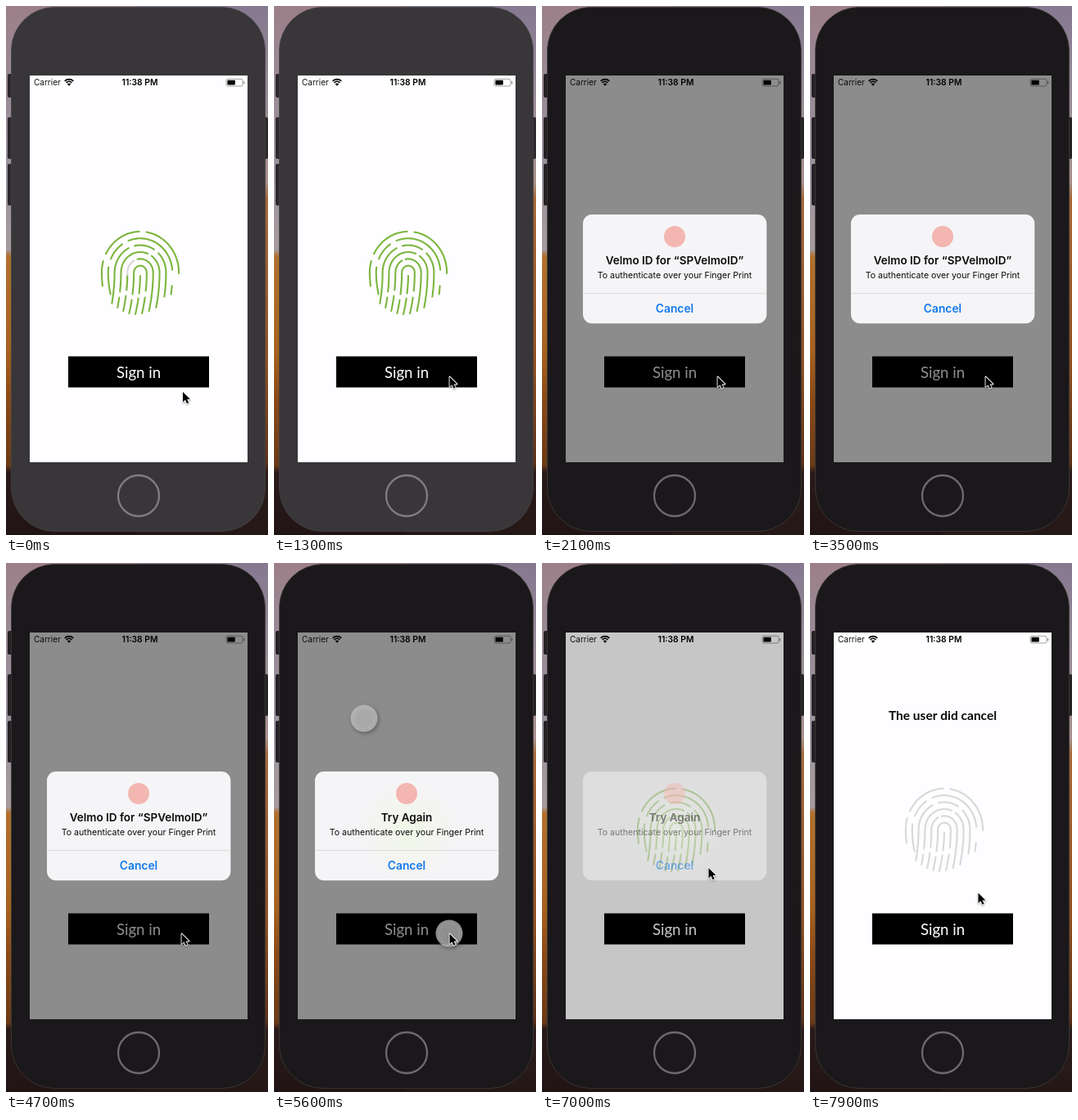
An HTML page with a canvas that plays this animation: 320x647 px, repeating every 8 s.

```html
<!DOCTYPE html>
<html lang="en">
<head>
<meta charset="utf-8">
<title>Fingerprint sign in</title>
<style>
html, body { margin: 0; width: 100%; height: 100%; overflow: hidden; background: #231419; }
canvas { display: block; width: 320px; height: 647px; }
</style>
</head>
<body>
<canvas id="stage"></canvas>
<script>
const W = 320, H = 647, LOOP = 8000;
const canvas = document.getElementById('stage');
const ctx = canvas.getContext('2d');
const dpr = window.devicePixelRatio || 1;
canvas.width = W * dpr;
canvas.height = H * dpr;

const UI = 'Inter, Roboto, sans-serif';
const GEO = 'Lato, "Open Sans", sans-serif';

const clamp = v => Math.max(0, Math.min(1, v));
const span = (t, a, b) => clamp((t - a) / (b - a));
const easeOut = u => 1 - (1 - u) * (1 - u);
const easeInOut = u => u * u * (3 - 2 * u);

function text(str, x, y, font, color, align = 'center') {
  ctx.font = font;
  ctx.fillStyle = color;
  ctx.textAlign = align;
  ctx.fillText(str, x, y);
}

function box(x, y, w, h, r, fill) {
  ctx.beginPath();
  ctx.roundRect(x, y, w, h, r);
  ctx.fillStyle = fill;
  ctx.fill();
}

function disc(x, y, r, fill) {
  ctx.beginPath();
  ctx.arc(x, y, r, 0, Math.PI * 2);
  ctx.fillStyle = fill;
  ctx.fill();
}

function fade(stops) {
  const g = ctx.createLinearGradient(0, 0, 0, H);
  stops.forEach(([y, c]) => g.addColorStop(y / H, c));
  return g;
}

const skyLeft = fade([[0, '#9c7f88'], [60, '#9a8792'], [200, '#9a939f'], [298, '#a59a9d'],
  [306, '#b0702f'], [420, '#a8621f'], [480, '#8a4a18'], [562, '#6a3a17'], [570, '#2a1a1a'], [647, '#211414']]);
const skyRight = fade([[0, '#857890'], [100, '#978a98'], [215, '#a8908c'], [235, '#a8683a'],
  [440, '#8f4f20'], [560, '#5c3018'], [570, '#2c1c1a'], [647, '#241816']]);

function drawPhone(active) {
  ctx.fillStyle = skyLeft;
  ctx.fillRect(0, 0, W / 2, H);
  ctx.fillStyle = skyRight;
  ctx.fillRect(W / 2, 0, W / 2, H);

  const key = active ? '#232124' : '#2b292c';
  [[83, 29], [136, 51], [193, 51]].forEach(([y, h]) => box(2, y, 8, h, 2, key));
  box(313, 136, 7, 51, 2, key);

  box(6.5, 1.5, 310, 641, 53, active ? '#1a181a' : '#383639');
  ctx.lineWidth = 0.8;
  ctx.strokeStyle = active ? '#3f3c38' : '#454346';
  ctx.stroke();

  ctx.beginPath();
  ctx.arc(162, 599, 25, 0, Math.PI * 2);
  ctx.lineWidth = 2.3;
  ctx.strokeStyle = active ? '#6c6a6c' : '#7f7d80';
  ctx.stroke();

  ctx.fillStyle = '#fefdff';
  ctx.fillRect(29, 85, 266, 473);
}

function drawStatus() {
  text('Carrier', 34, 97.3, '10px ' + UI, '#111', 'left');
  text('11:38 PM', 163.5, 97.3, '600 10.3px ' + UI, '#000');

  ctx.strokeStyle = '#000';
  ctx.lineWidth = 1.7;
  [7.5, 4.8].forEach(r => {
    ctx.beginPath();
    ctx.arc(77, 97.2, r, -Math.PI * 0.75, -Math.PI * 0.25);
    ctx.stroke();
  });
  ctx.beginPath();
  ctx.moveTo(77, 97.8);
  ctx.arc(77, 97.8, 3.2, -Math.PI * 0.75, -Math.PI * 0.25);
  ctx.fillStyle = '#000';
  ctx.fill();

  ctx.beginPath();
  ctx.roundRect(269, 89.3, 20, 8.7, 2);
  ctx.lineWidth = 0.8;
  ctx.strokeStyle = '#8a898b';
  ctx.stroke();
  box(270.4, 90.7, 9.4, 5.9, 0.8, '#000');
  box(290, 92, 1.2, 3.4, 0.6, '#8a898b');
}

// Ridges: ring, start, end. |s| <= 1 is the arch, beyond that a leg running down.
const ridges = [
  [6, -0.7, -0.02], [6, 0.1, 1.02], [6, -0.82, -1.32],
  [5, -0.74, -0.38], [5, -0.24, 0.95], [5, -0.9, -1.52], [5, 1.32, 1.52],
  [4, -1.74, -0.3], [4, -0.14, 0.36], [4, 0.5, 1.58],
  [3, -1.84, -1.6], [3, -1.46, 0.25], [3, 0.4, 1.84],
  [2, -1.92, -1.56], [2, -1.42, -0.32], [2, -0.14, 1.92],
  [1, -1.98, -1.66], [1, -1.52, 1.44], [1, 1.6, 1.98],
  [0, 1.08, 1.5], [0, 1.62, 2]
];
const LATE = 14;

function ridgePoint(ring, s) {
  const side = Math.sign(s), a = Math.min(1, Math.abs(s)) * Math.PI / 2;
  const leg = Math.max(0, Math.abs(s) - 1);
  const r = ring * 7.85;
  const drift = side < 0 && ring > 4 ? 11 : -6;
  return [164 + side * r * Math.sin(a) + drift * Math.pow(leg, 2),
    326 - r * 1.065 * Math.cos(a) + leg * 51];
}

function drawRidge([ring, s0, s1], part, color) {
  if (part <= 0) return;
  ctx.beginPath();
  for (let i = 0; i <= 24; i++) {
    ctx.lineTo(...ridgePoint(ring, s0 + (s1 - s0) * part * i / 24));
  }
  ctx.strokeStyle = color;
  ctx.stroke();
}

function drawPrint(t) {
  const left = 1 - span(t, 7200, 7850);
  ctx.lineWidth = 2.1;
  ctx.lineCap = 'round';
  ridges.forEach((ridge, i) => {
    const drawn = i === LATE ? 0.3 + 0.7 * span(t, 0, 400) : 1;
    const part = drawn * left;
    if (part < 1) drawRidge(ridge, 1, '#d9d7d9');
    drawRidge(ridge, part, '#7cb63f');
  });
  ctx.lineCap = 'butt';
}

function drawScreen(t) {
  drawStatus();
  drawPrint(t);
  ctx.globalAlpha = span(t, 7200, 7300);
  text('The user did cancel', 162, 192, 'bold 15.5px ' + GEO, '#0a0a0a');
  ctx.globalAlpha = 1;
  ctx.fillStyle = '#000';
  ctx.fillRect(76, 428.5, 172, 38);
  text('Sign in', 162, 455, '18.6px ' + GEO, '#fff');
}

function drawAlert(t) {
  const shown = easeOut(span(t, 1500, 1940));
  const kept = 1 - easeInOut(span(t, 6850, 7150));
  if (!shown || !kept) return;
  const retry = t >= 5400;

  ctx.fillStyle = `rgba(0,0,0,${0.447 * shown * kept})`;
  ctx.fillRect(29, 85, 266, 473);

  ctx.save();
  ctx.globalAlpha = Math.min(1, shown * 1.25) * kept;
  const k = 1.2 - 0.2 * shown;
  ctx.translate(162, 321.5);
  ctx.scale(k, k);
  ctx.translate(-162, -321.5);

  box(50, 255, 224.3, 133.3, 11, '#f5f4f6');
  if (retry) {
    const glow = ctx.createRadialGradient(164, 326, 5, 164, 326, 58);
    glow.addColorStop(0, 'rgba(240,247,228,.8)');
    glow.addColorStop(1, 'rgba(240,247,228,0)');
    ctx.fillStyle = glow;
    ctx.fill();
  }
  disc(162, 282, 13, '#f3b6b0');
  text(retry ? 'Try Again' : 'Velmo ID for “SPVelmoID”', 162, 316, '600 13.5px ' + UI, '#0b0b0c');
  text('To authenticate over your Finger Print', 162, 333.4, '10.6px ' + UI, '#0b0b0c');
  ctx.fillStyle = '#d8d7da';
  ctx.fillRect(50, 351, 224.3, 0.8);
  text('Cancel', 162, 375, '600 13.8px ' + UI, '#1279ee');
  ctx.restore();
}

function drawTouches(t) {
  if (t < 5000 || t >= 5900) return;
  [[110, 190], [214, 453]].forEach(([x, y]) => {
    ctx.save();
    ctx.shadowColor = 'rgba(0,0,0,.45)';
    ctx.shadowBlur = 5 * dpr;
    ctx.shadowOffsetX = 1.5 * dpr;
    ctx.shadowOffsetY = 2 * dpr;
    disc(x, y, 16.5, 'rgba(200,199,200,.72)');
    ctx.restore();
    ctx.beginPath();
    ctx.arc(x, y, 12.5, 0, Math.PI * 2);
    ctx.lineWidth = 0.8;
    ctx.strokeStyle = 'rgba(255,255,255,.14)';
    ctx.stroke();
  });
}

const moves = [[400, 1150, 214.5, 453.5], [6000, 6700, 203.5, 373], [7150, 7750, 205.5, 403.5]];
const arrow = new Path2D('M0 0V12.4L2.9 9.8L5 14.3L7.1 13.3L5.1 9H9Z');

function drawCursor(t) {
  let x = 216, y = 472;
  moves.forEach(([a, b, tx, ty]) => {
    const u = easeInOut(span(t, a, b));
    x += (tx - x) * u;
    y += (ty - y) * u;
  });
  ctx.save();
  ctx.translate(x, y);
  ctx.lineWidth = 1.8;
  ctx.lineJoin = 'round';
  ctx.strokeStyle = '#fff';
  ctx.shadowColor = 'rgba(0,0,0,.35)';
  ctx.shadowBlur = 2 * dpr;
  ctx.shadowOffsetY = dpr;
  ctx.stroke(arrow);
  ctx.shadowColor = 'transparent';
  ctx.fillStyle = '#000';
  ctx.fill(arrow);
  ctx.restore();
}

function render(t) {
  ctx.setTransform(dpr, 0, 0, dpr, 0, 0);
  drawPhone(t >= 1400);
  drawScreen(t);
  drawAlert(t);
  drawTouches(t);
  drawCursor(t);
}

const start = performance.now();
function tick() {
  render((performance.now() - start) % LOOP);
  requestAnimationFrame(tick);
}
tick();
</script>
</body>
</html>
```
